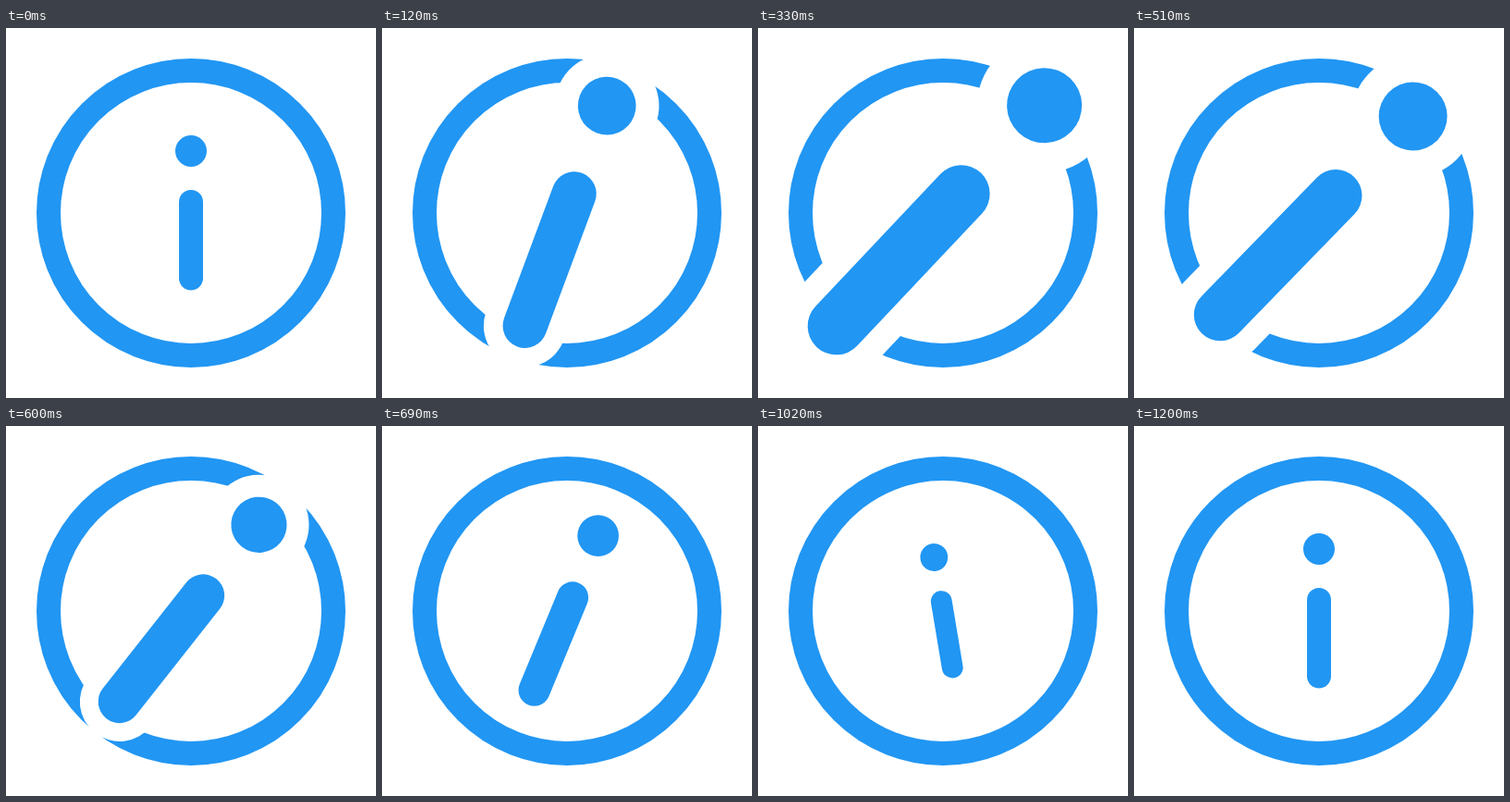
An HTML page that plays this animation: 400 by 400 pixels, repeating every 1.73 s.

```html
<!DOCTYPE html>
<html lang="en">
<head>
<meta charset="utf-8">
<title>Info icon</title>
<style>
  html, body { margin: 0; width: 100%; height: 100%; overflow: hidden; background: #fff; }
  svg { display: block; width: 100%; height: 100%; }
</style>
</head>
<body>
<svg viewBox="-200 -200 400 400">
  <circle r="154" fill="none" stroke="#2196f3" stroke-width="26"/>
  <g id="letter" stroke-linecap="round">
    <!-- white halo that cuts the ring -->
    <circle cy="-67" r="30.5" fill="#fff"/>
    <path d="M0-12V70.5" stroke="#fff" stroke-width="48.4"/>
    <circle cy="-67" r="17" fill="#2196f3"/>
    <path d="M0-12V70.5" stroke="#2196f3" stroke-width="26"/>
  </g>
</svg>
<script>
  const LOOP = 1730, STEP = 30;
  const letter = document.getElementById('letter');

  const smooth = u => u * u * (3 - 2 * u);
  const lateSmooth = u => smooth(u ** 1.85);
  const sineOut = u => Math.sin(u * Math.PI / 2);
  const powerOut = u => 1 - (1 - u) ** 2.6;

  // Each key: time, value, easing towards that value
  const scaleKeys = [[0, 1], [400, 2.4, powerOut], [870, 0.785, smooth], [1200, 1, smooth]];
  const angleKeys = [[0, 0], [400, 45, sineOut], [870, -16.7, lateSmooth], [1200, 0, smooth]];

  function valueAt(keys, t) {
    const i = keys.findIndex(key => t < key[0]);
    if (i < 0) return keys[keys.length - 1][1];
    const [t0, from] = keys[i - 1], [t1, to, ease] = keys[i];
    return from + (to - from) * ease((t - t0) / (t1 - t0));
  }

  function draw() {
    const t = Math.floor(performance.now() % LOOP / STEP) * STEP;
    letter.setAttribute('transform',
      `rotate(${valueAt(angleKeys, t)}) scale(${valueAt(scaleKeys, t)})`);
    requestAnimationFrame(draw);
  }
  draw();
</script>
</body>
</html>
```
